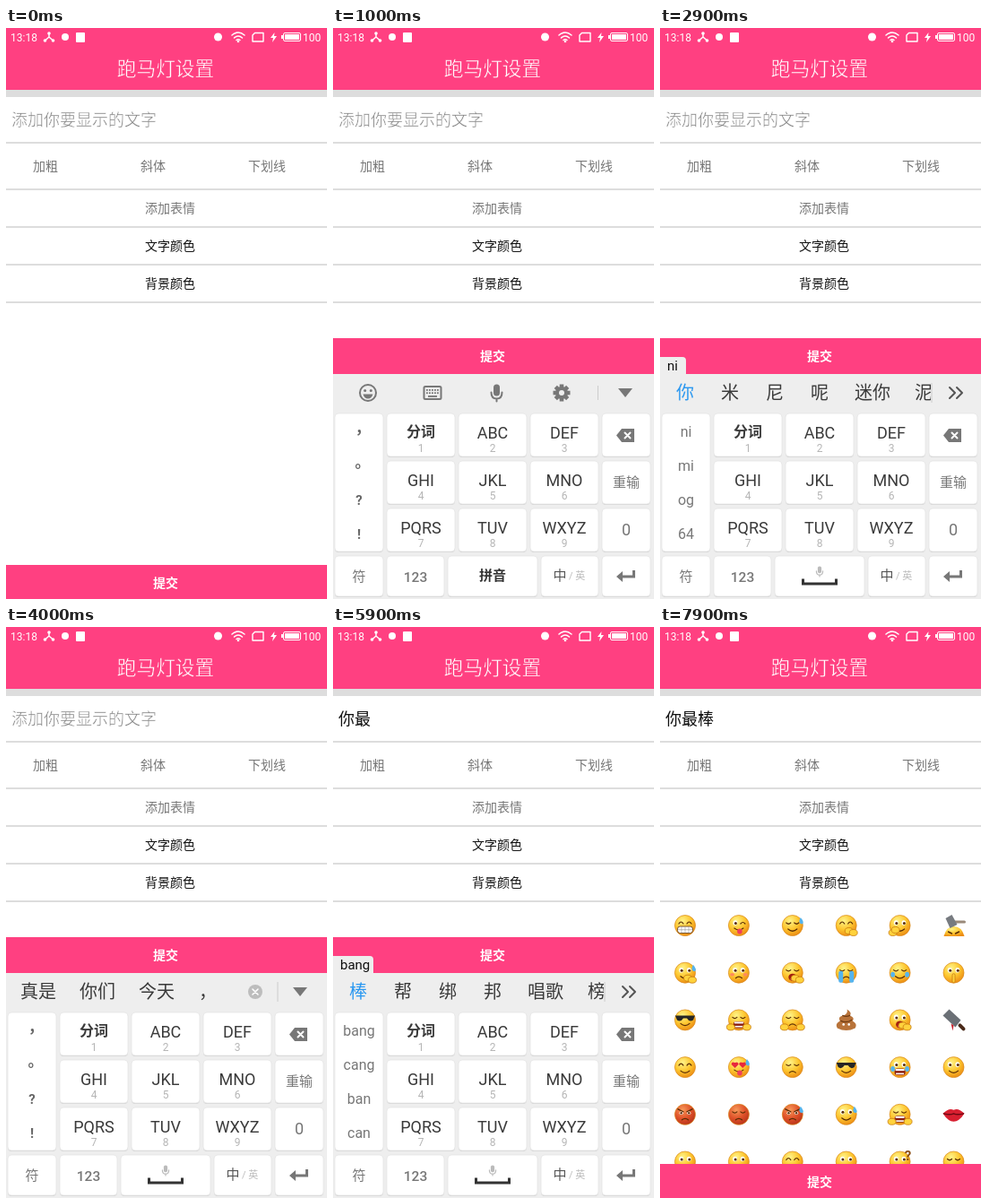
Recreate the animation shown at these times as an HTML page. Size 358 by 637 pixels, loop 8000 ms.

```html
<!DOCTYPE html>
<html lang="zh-CN">
<head>
<meta charset="utf-8">
<title>跑马灯设置</title>
<style>
html, body { margin: 0; width: 100%; height: 100%; overflow: hidden; background: #fff; }
svg { display: block; width: 358px; height: 637px; }
text { font-family: Roboto, "Noto Sans CJK SC", "Noto Sans CJK", sans-serif; white-space: pre; }
.line { fill: none; stroke-linecap: round; stroke-linejoin: round; }
</style>
</head>
<body>
<svg id="stage" viewBox="0 0 358 637"></svg>
<script>
const LOOP = 8000, PINK = '#ff4081', BLUE = '#2b98f0', GREY = '#777', DARK = '#3a3a3a';

const rect = (x, y, w, h, fill, r = 0, more = '') =>
  `<rect x="${x}" y="${y}" width="${w}" height="${h}" rx="${r}" fill="${fill}" ${more}/>`;
const text = (s, x, y, size, fill, weight = 400, anchor = 'start') =>
  `<text x="${x}" y="${y}" font-size="${size}" fill="${fill}" font-weight="${weight}" text-anchor="${anchor}">${s}</text>`;
const mid = (s, x, y, size, fill, weight) => text(s, x, y, size, fill, weight, 'middle');
// a hairline in the background colour makes the strokes of the text lighter
const thin = (back, body) => `<g stroke="${back}" stroke-width=".45">${body}</g>`;
const shape = (d, fill, more = '') => `<path d="${d}" fill="${fill}" ${more}/>`;
const line = (d, stroke, width = 1) => `<path class="line" d="${d}" stroke="${stroke}" stroke-width="${width}"/>`;
const dot = (x, y, r, fill, more = '') => `<circle cx="${x}" cy="${y}" r="${r}" fill="${fill}" ${more}/>`;
const ell = (x, y, rx, ry, fill) => `<ellipse cx="${x}" cy="${y}" rx="${rx}" ry="${ry}" fill="${fill}"/>`;
const at = (x, y, body) => `<g transform="translate(${x} ${y})">${body}</g>`;

// ---- page ----
function statusBar() {
  const w = '#fff';
  return text('13:18', 5, 14.5, 12, w) + text('100', 331, 14.5, 12, w) +
    line('M48 6V10L43.500 14M48 10L52.500 14', w, 1.4) +
    dot(48, 6, 1.8, w) + dot(43.5, 14, 1.8, w) + dot(52.5, 14, 1.8, w) +
    dot(66, 10, 4, w) + rect(78, 5, 10, 11, w, 1) + dot(236.5, 10, 4.5, w) +
    line('M252 8q7-6 14 0M254.500 11q4.500-4 9 0', w, 1.5) + line('M257 13.500q2-1.500 4 0', w, 1.5) + dot(259, 15, 1.3, w) +
    line('M277.500 5.500H287V15H275V8Z', w, 1.4) +
    shape('M299.500 5L295 11H298L297 16L302 9H299Z', w) +
    rect(309.5, 5.5, 19, 9, 'none', 1.5, `stroke="${w}"`) + rect(311, 7, 16, 6, w) + rect(307, 8, 2, 4, w);
}

function page() {
  const rules = [127, 179, 221, 263, 305].map(y => rect(0, y, 358, 2, '#ddd')).join('');
  return rect(0, 0, 358, 637, '#fff') + rect(0, 0, 358, 69, PINK) + rect(0, 69, 358, 8, '#ddd') + rules +
    statusBar() + thin(PINK, mid('跑马灯设置', 178, 53, 21.7, '#fff', 300)) +
    text('加粗', 30, 159, 14, GREY) + text('斜体', 150, 159, 14, GREY) + text('下划线', 270, 159, 14, GREY) +
    mid('添加表情', 183, 206, 14, GREY) + mid('文字颜色', 183, 248, 14, '#111') + mid('背景颜色', 183, 290, 14, '#111');
}

// ---- emoticons: eyes, mouth, then extras ----
const INK = '#5a2d05', HAND = '#ffd23c', WATER = '#55b4ee';
const pair = draw => draw(-4.3) + draw(4.3);
const hand = (x, y) => `<ellipse cx="${x}" cy="${y}" rx="4.500" ry="3.500" fill="${HAND}" stroke="#c87a10" stroke-width=".8"/>`;
const EYES = {
  o: pair(x => ell(x, -3, 2.4, 2.8, '#fff') + dot(x + .5, -2.5, 1.5, INK)),
  '^': line('M-7-2q2.500-4 5 0M2-2q2.500-4 5 0', INK, 1.2),
  '-': line('M-7-3q2.500 2.500 5 0M2-3q2.500 2.500 5 0', INK, 1.2),
  w: ell(-4, -3, 2.4, 2.8, '#fff') + dot(-3.5, -2.5, 1.5, INK) + line('M2-2q2.500-3 5 0', INK, 1.2),
  a: line('M-8-6L-2-3M8-6L2-3', INK, 1.4) + pair(x => ell(x, -1.5, 2, 1.8, '#fff') + dot(x, -1.5, 1.2, INK)),
  G: shape('M-11-5H11L9 0Q5 3 2-2H-2Q-5 3-9 0Z', '#252525'),
  L: pair(x => shape(`M${x} 1l-4-4q0-4 4-2q4-2 4 2z`, '#e8283c'))
};
const MOUTHS = {
  n: '',
  s: line('M-5 4q5 4.500 10 0', INK, 1.2),
  f: line('M-3.500 6q3.500-3 7 0', INK, 1.2),
  g: rect(-8.5, 1, 17, 7.5, '#fff', 3, `stroke="${INK}" stroke-width=".8"`) + line('M-8 4.700H8M-4 1.500V8M0 1.500V8M4 1.500V8', '#999', .6),
  t: line('M-5 3q5 4 10 0', INK, 1.2) + ell(1, 6.5, 2.8, 3, '#f0405c'),
  o: ell(0, 5, 4.5, 4, '#a3200f') + ell(0, 7, 2.5, 1.5, '#f06a6a'),
  e: rect(-6, 1.5, 12, 7.5, '#8c2010', 3) + rect(-5, 2, 10, 2, '#fff') + rect(-4.5, 6.5, 9, 1.6, '#fff')
};
const EXTRAS = {
  d: shape('M9-9q5 6 1.500 7.500q-5-1-1.500-7.500z', WATER),
  c: rect(-8.5, -2, 5, 13, WATER, 2) + rect(3.5, -2, 5, 13, WATER, 2),
  j: ell(-8, 2, 2.4, 3, WATER) + ell(8, 2, 2.4, 3, WATER),
  h: hand(3, 6) + hand(8, 8),
  l: hand(-8, 8) + hand(-5, 5),
  H: hand(-9, 8) + hand(9, 8),
  f: rect(-1.5, 1, 3, 10, HAND, 1.5, 'stroke="#c87a10" stroke-width=".8"'),
  p: pair(x => ell(x * 1.7, 2, 2.5, 1.8, '#ff8a5c')),
  q: mid('?', 9, -2, 15, '#8a4b12', 700),
  r: ''
};
const face = (eyes, mouth, ...extras) =>
  dot(0, 0, 11.5, extras.includes('r') ? 'url(#red)' : 'url(#gold)', 'stroke="#d8891a" stroke-width=".7"') +
  EYES[eyes] + MOUTHS[mouth] + extras.map(e => EXTRAS[e]).join('');
const THINGS = {
  hammer: () => shape('M-11 12Q-8 1 0 1Q9 1 12 12Z', 'url(#gold)') + line('M-6 7l4 2M6 7l-4 2', INK, 1.4) +
    line('M-1-4L12-4', '#9a8a7a', 3) + shape('M-9-8L-2-12L4-1L-4 3Z', '#777b80'),
  poop: () => shape('M1-12Q7-8 4-5Q10-3 7 1Q13 4 10 9Q0 14-10 9Q-13 4-7 1Q-10-4-3-5Q2-7 1-12Z', '#b8733a') +
    line('M-6 1Q0 4 6 0M-4-5Q0-3 4-5', '#6f3b12', 1.2) + pair(x => dot(x * .7, 5, 1.3, '#fff')),
  knife: () => shape('M-12-5L-5-12L8 0L2 8Z', '#6b7076') + line('M7 6L11 10', '#4a2a1a', 4) + shape('M-3 4l3 2l-1 6z', '#c8202c'),
  lips: () => shape('M-12-1Q-5-8 0-5Q5-8 12-1Q6 8 0 8Q-6 8-12-1Z', '#d81f30') + line('M-11-1Q-4 1 0-1Q4 1 11-1', '#6d0812', 1.4)
};
const FACES = `^g wt -sd ^nh osl hammer
osdh ofp -oh -fc -sj onf
Gs -eH -fH poop ooh knife
^s Ltd -f Gs oej os
afr -fr afrd osd -eH lips
os of ^s os ofq -f`;
const emoticons = () => FACES.split('\n').map((row, r) => row.split(' ').map((code, c) =>
  at(28 + 59.9 * c, 333 + 52.7 * r, THINGS[code] ? THINGS[code]() : face(...code))).join('')).join('');

// ---- keyboard ----
const key = (x, y, w, h, pressed) =>
  rect(x, y + 1, w, h, '#d6d6d6', 4) + rect(x, y, w, h, pressed ? '#d4d4d4' : '#fff', 4, 'stroke="#e2e2e2" stroke-width=".7"');
const LETTERS = ['分词', 'ABC', 'DEF', 'GHI', 'JKL', 'MNO', 'PQRS', 'TUV', 'WXYZ'];

const mic = (x, y, k, color) => `<g transform="translate(${x} ${y}) scale(${k})">` +
  rect(-3.5, -10, 7, 13, color, 3.5) + line('M-6-1Q-6 6 0 6Q6 6 6-1M0 6V9', color, 2) + '</g>';

function tools() {
  const teeth = [0, 45, 90, 135].map(a => `<rect x="-2.300" y="-9.500" width="4.600" height="19" fill="${GREY}" transform="rotate(${a})"/>`).join('');
  const dots = [0, 1, 2, 3, 4].map(i => rect(104 + i * 3, 403, 1.8, 1.8, GREY) + rect(104 + i * 3, 406.3, 1.8, 1.8, GREY)).join('');
  return dot(39, 407, 9, 'none', `stroke="${GREY}" stroke-width="2"`) + dot(35.7, 404.5, 1.5, GREY) + dot(42.3, 404.5, 1.5, GREY) +
    shape('M33.500 408.500H44.500Q43 413.500 39 413.500Q35 413.500 33.500 408.500Z', GREY) +
    rect(101.5, 400, 19, 14, 'none', 1.5, `stroke="${GREY}" stroke-width="2"`) + dots + rect(106, 410, 10, 1.8, GREY) +
    mic(182.5, 407.5, 1, GREY) + at(255, 407, teeth + dot(0, 0, 7, GREY) + dot(0, 0, 3, '#eee')) +
    rect(295, 399, 1, 16, '#ccc') + shape('M318 402H334L326 412Z', GREY);
}

function candidates({ words, first, popup, hide }) {
  const xs = popup ? [18, 68, 118, 168, 217, 284] : [16, 82, 148, 215];
  const list = words.map((w, i) => w === '？' ? text('?', 217, 414, 20, DARK) :
    text(w, xs[i], 414, 20, i === 0 && first ? BLUE : DARK)).join('');
  const tail = popup
    ? line('M323 401L329 407L323 413M331 401L337 407L331 413', '#555', 2)
    : dot(278, 407, 8, '#bdbdbd') + line('M275 404L281 410M281 404L275 410', '#fff', 1.6) +
      shape('M320 402H336L328 412Z', hide ? BLUE : GREY);
  const bubble = popup ? shape(`M0 367H${popup.length * 8 + 9}q4 0 4 4V387H0Z`, '#eee') + text(popup, 8, 382, 15, '#111') : '';
  return `<g clip-path="url(#bar)">${list}</g>` + rect(302.5, 396, 1, 22, '#ccc') + tail + bubble;
}

function keyboard(s) {
  const pad = LETTERS.map((label, i) => {
    const x = 60 + i % 3 * 80, y = 430 + Math.floor(i / 3) * 53, cx = x + 38;
    return key(x, y, 76, 48, s.press === i + 1) +
      (i ? mid(label, cx, y + 28, 18, DARK) : mid(label, cx, y + 26, 16, DARK, 700)) +
      mid(i + 1, cx, y + 43, 12, '#b5b5b5');
  }).join('');
  const side = s.side
    ? s.side.map((p, i) => mid(p, 29, 456 + 38 * i, 16, GREY)).join('')
    : text('，', 24.5, 452, 17, '#666', 700) + text('。', 24.5, 490, 17, '#666', 700) +
      mid('?', 29, 532, 15, '#666', 700) + mid('!', 29, 570, 15, '#666', 700);
  const space = s.spaceName ? mid('拼音', 178, 616, 15, '#333', 700)
    : mic(178, 606.5, .6, '#bbb') + `<path d="M159.500 614.500V620H196.500V614.500" fill="none" stroke="#333" stroke-width="3"/>`;
  return rect(0, 386, 358, 251, '#eee') + key(2, 430, 54, 154) + side + pad +
    [430, 483, 536].map(y => key(300, y, 54, 48)).join('') +
    [[2, 54], [60, 64], [128, 100], [232, 64], [300, 54]].map(([x, w]) => key(x, 589, w, 45)).join('') +
    shape('M316 454.500L322 447H336V462H322Z', GREY) + line('M325.500 451.500L331.500 457.500M331.500 451.500L325.500 457.500', '#fff', 2) +
    mid('重输', 327, 512, 15, GREY) + mid('0', 327, 566, 18, GREY) +
    mid('符', 29, 617, 15, GREY) + mid('123', 92, 617.5, 15.5, GREY, 500) + space +
    text('中', 245.5, 616, 15, '#555') + text('/ 英', 263, 615, 11, '#bbb') +
    shape('M316 612L323 606V610.500H334V605H337V613.500H323V618Z', GREY) +
    (s.words ? candidates(s) : tools());
}

// ---- timeline: each step changes part of the state ----
const typing = (popup, words, side, press = 0) => ({ popup, words: words.split(' '), side: side.split(' '), first: true, press });
const guess = mark => ({ popup: '', words: ['真是', '你们', '今天', mark], side: null, first: false, press: 0 });
const STEPS = [
  [0, { value: '', words: null, side: null, popup: '', press: 0, spaceName: true, up: false, hide: false, emoji: false }],
  [700, { up: true }],
  [1500, { spaceName: false }],
  [2500, { press: 6 }],
  [2600, typing('o', '哦 噢 嗯 们 那 你', 'o m n 6')],
  [2700, { press: 4 }],
  [2800, typing('ni', '你 米 尼 呢 迷你 泥', 'ni mi og 64')],
  [3900, { press: 0 }],
  [4000, guess('，')],
  [4500, { value: '你' }],
  [4900, { press: 9 }],
  [5000, typing('w', '我 下 在 想 一样 有', 'w x y z', 8)],
  [5100, typing('zu', '组 无 与 五 需要 足', 'zu wu xu yu', 4)],
  [5200, typing('zui', '最 嘴 醉 罪 误会 咀', 'zui wu xu yu')],
  [5400, { value: '你最', ...guess('，') }],
  [5500, { press: 2 }],
  [5600, typing('ba', '吧 把 爸 八 才能 擦', 'ba ca a b', 6)],
  [5700, typing('bang', '帮 棒 绑 邦 唱歌 榜', 'bang cang ban can')],
  [5900, { words: '棒 帮 绑 邦 唱歌 榜'.split(' ') }],
  [6400, { value: '你最棒', ...guess('？') }],
  [7200, { hide: true }],
  [7300, { up: false }],
  [7900, { emoji: true }]
];
const BLINKS = [[500, 1000], [1500, 1900], [2400, 2900], [3300, 3700], [4500, 4900], [5400, 5900], [6400, 6900], [7400, 7900]];

const clamp = v => Math.min(1, Math.max(0, v));
const easeOut = v => 1 - (1 - v) ** 2;
const drop = t => 251 * (t < 4000 ? 1 - easeOut(clamp((t - 500) / 400)) : clamp((t - 7200) / 400) ** 2);

const stage = document.getElementById('stage');
const stops = (id, a, b, c) => `<radialGradient id="${id}" cx=".38" cy=".28" r=".75"><stop stop-color="${a}"/>` +
  `<stop offset=".55" stop-color="${b}"/><stop offset="1" stop-color="${c}"/></radialGradient>`;
stage.innerHTML = `<defs>${stops('gold', '#fff48a', '#fdc62f', '#ec8c14')}${stops('red', '#f79a5a', '#e0532a', '#b8321a')}` +
  `<clipPath id="bar"><rect y="386" width="302" height="42"/></clipPath></defs>` + page() +
  `<g id="field"></g>${rect(6, 92, 1.5, 21, '#4fb8ac', 0, 'id="caret"')}<g id="faces">${emoticons()}</g>` +
  `<g id="submit">${rect(0, 0, 358, 40, PINK)}${mid('提交', 178, 25, 14, '#fff', 700)}</g><g id="board"></g>`;
const [field, caret, faces, submit, board] = ['field', 'caret', 'faces', 'submit', 'board'].map(id => document.getElementById(id));

let shown = -1;
function showStep(count) {
  const s = Object.assign({}, ...STEPS.slice(0, count).map(step => step[1]));
  field.innerHTML = s.value ? text(s.value, 6, 109, 18, '#111') : thin('#fff', text('添加你要显示的文字', 6, 109, 18, '#888', 300));
  caret.setAttribute('x', 6 + 18 * s.value.length);
  faces.style.display = s.emoji ? '' : 'none';
  submit.setAttribute('transform', `translate(0 ${s.up ? 346 : 599})`);
  board.innerHTML = keyboard(s);
}
function render() {
  const t = performance.now() % LOOP;
  const count = STEPS.filter(step => step[0] <= t).length;
  if (count !== shown) showStep(shown = count);
  caret.style.display = BLINKS.some(([on, off]) => t >= on && t < off) ? '' : 'none';
  const y = drop(t);
  board.style.display = y < 251 ? '' : 'none';
  board.setAttribute('transform', `translate(0 ${y.toFixed(1)})`);
  requestAnimationFrame(render);
}
render();
</script>
</body>
</html>
```
